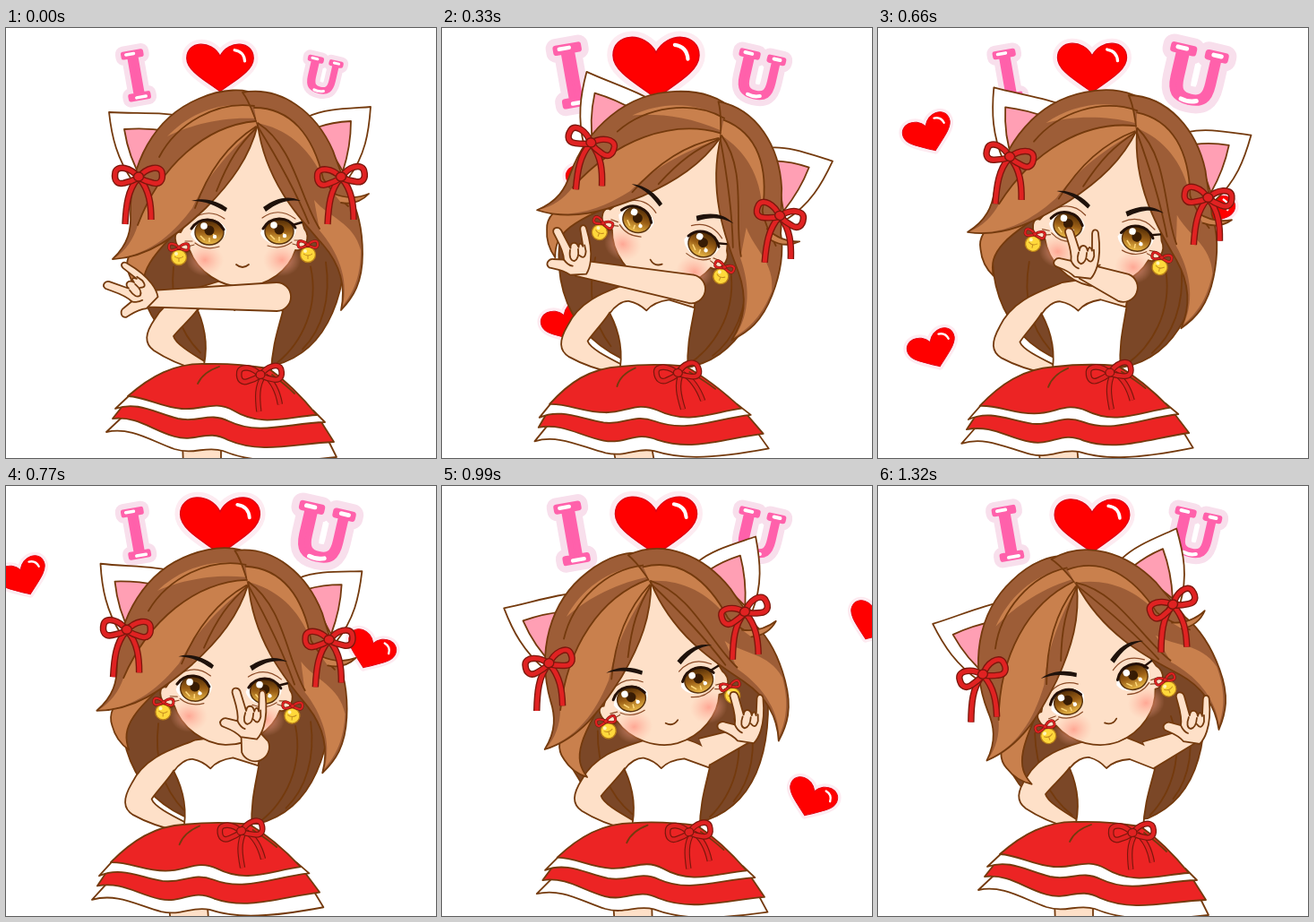
These frames come from a looping animation (480x480 px, 1.98 s). An HTML page:

```html
<!DOCTYPE html>
<html lang="en">
<head>
<meta charset="utf-8">
<title>I love U</title>
<style>
html, body { margin: 0; width: 100%; height: 100%; overflow: hidden; background: #fff; }
svg { display: block; width: 100vw; height: 100vh; }
.ol { stroke: #743a0d; stroke-width: 1.8; stroke-linejoin: round; stroke-linecap: round; }
.no { fill: none; }
.skin { fill: #fee0c8; }
.lt { fill: #c9804d; }
.md { fill: #9d5d37; }
.dk { fill: #7b4727; }
.red { fill: #ec2424; }
.white { fill: #fff; }
.pink { fill: #ff9fb4; }
.edge { fill: none; stroke: #7c170c; stroke-width: 7.5; stroke-linejoin: round; }
.ribbon { fill: none; stroke: #e02222; stroke-width: 4.8; stroke-linejoin: round; }
.shine { fill: none; stroke: #fff; stroke-width: 4; stroke-linecap: round; }
text { font-family: "DejaVu Serif", serif; text-anchor: middle; fill: #ff61ab; stroke: #ff61ab; stroke-width: 6; stroke-linejoin: round; }
.glow { stroke: #f8dfec; stroke-width: 20; fill: #f8dfec; }
</style>
</head>
<body>
<svg viewBox="0 0 480 480">
<defs>
  <radialGradient id="blush"><stop offset="0" stop-color="#ff9483" stop-opacity=".75"/><stop offset="1" stop-color="#ffb39c" stop-opacity="0"/></radialGradient>
  <linearGradient id="iris" x2="0" y2="1"><stop offset="0" stop-color="#4d2905"/><stop offset=".5" stop-color="#9b5f16"/><stop offset="1" stop-color="#eebd4a"/></linearGradient>
  <path id="hs" d="M0 32C-18 18-46 4-46-14C-46-38-12-40 0-17C12-40 46-38 46-14C46 4 18 18 0 32Z"/>
  <g id="heart">
    <use href="#hs" fill="#fdebf1" stroke="#fdebf1" stroke-width="13" stroke-linejoin="round"/>
    <use href="#hs" fill="#f00" stroke="#e00010" stroke-width="1.5"/>
    <path class="shine" d="M20-25Q33-23 34-10"/>
  </g>
  <path id="ls" d="M0 1C-9-11-24-13-26-5C-28 5-23 9-16 7Q-7 5 0 1C9-11 24-13 26-5C28 5 23 9 16 7Q7 5 0 1Z"/>
  <path id="ts" d="M-1 2C-12 15-14 32-15 53M1 2C12 15 14 31 14 48"/>
  <g id="loops"><use href="#ls" class="edge"/><use href="#ls" class="ribbon"/><ellipse rx="5.5" ry="5" fill="#e02222" stroke="#7c170c" stroke-width="1.4"/></g>
  <g id="tails"><use href="#ts" class="edge"/><use href="#ts" class="ribbon"/></g>
  <g id="bell">
    <circle cy="4" r="8.5" fill="#ffd83b" stroke="#b9801a" stroke-width="1.3"/>
    <path d="M-5 3Q0 7 5 3M0 5V9" fill="none" stroke="#c58d20"/>
    <circle cx="-3" r="2" fill="#fff6b8"/>
    <use href="#loops" transform="translate(0 -7) scale(.42)"/>
  </g>
  <g id="eye">
    <path class="white" d="M-20 3C-14-15 12-19 20-2C19 18-13 22-20 3Z"/>
    <ellipse cx="1" cy="1" rx="16" ry="14" fill="url(#iris)" stroke="#5b330c" stroke-width="1.5"/>
    <path d="M-9 5L-4 10M1 12V7M9 7L5 3" stroke="#ffd87a" stroke-width="1.5"/>
    <circle cx="1" cy="-1" r="5.5" fill="#381c04"/>
    <circle cx="-5" cy="-6" r="3.8" fill="#fff"/><circle cx="7" cy="6" r="2.2" fill="#fff"/>
  </g>
  <g id="lids" class="no" stroke="#241006" stroke-linecap="round">
    <path d="M-17-2C-9-16 10-17 19-3" stroke-width="3"/>
    <path d="M-18-14Q0-27 19-13M-12 17Q3 22 15 13M16 15L23 17M18 11L26 11" stroke="#8b4b27" stroke-width="1.2"/>
  </g>
</defs>

<g id="I"><text class="glow" y="29" font-size="80">I</text><text y="29" font-size="80">I</text>
  <path class="shine" d="M-8-28H2M-4 28H8"/></g>
<g id="U"><text class="glow" y="23" font-size="63">U</text><text y="23" font-size="63">U</text>
  <path class="shine" d="M-20-22H-12M13-22H20M-7 23Q0 25 7 22" stroke-width="3"/></g>
<use id="mid" href="#heart"/>
<g id="fly"></g>

<g id="back">
  <path class="ol dk" d="M-112-40C-136 60-104 124-35 148L35 150C95 134 120 70 115-30Z"/>
  <path class="ol no" stroke-width="1" d="M-78 40Q-84 100-48 136M75 40C85 85 65 125 38 147M92 35C98 75 88 110 66 132"/>
</g>

<g id="body">
  <path class="ol skin" d="M240 282C220 289 184 294 166 325C155 341 154 352 165 360C180 370 200 378 217 383L223 373C205 362 189 352 187 344C194 335 207 324 214 314L222 336L303 336L312 302C306 290 290 286 275 280Z"/>
  <path class="ol white" d="M214 315C220 307 229 302 236 303Q247 306 255 315Q264 306 281 305L309 316C304 336 297 355 296 384H219C226 360 223 336 214 315Z"/>
  <g id="skirt">
    <path class="ol skin" d="M197 462L198 490H240V462Z"/>
    <path class="ol white" d="M130 434L112 451C140 445 162 461 188 470C210 477 223 466 242 472C266 482 297 487 369 479L357 455Z"/>
    <path class="ol red" d="M134 417L119 436C147 433 163 449 188 456C213 463 224 447 248 460C285 476 322 464 366 462L347 432Z"/>
    <path class="ol white" d="M140 408L122 425C147 416 167 430 192 436C216 441 226 428 249 439C282 455 316 441 356 440L343 427Z"/>
    <path class="ol red" d="M222 375C188 374 161 389 136 411C157 412 172 423 196 425C220 427 232 415 254 427C285 446 313 434 347 432C329 410 313 394 293 380Q257 374 222 375Z"/>
    <path class="ol no" d="M238 378Q220 384 214 397M297 387Q313 399 322 408"/>
    <g transform="translate(284 387) rotate(-4)"><use href="#tails" transform="translate(4) rotate(-6) scale(.85 .75)"/><use href="#loops" transform="scale(.9)"/></g>
  </g>
</g>

<g id="head">
  <path class="ol white" d="M205 98C178 91 146 94 115 92C118 120 124 144 142 170Z"/>
  <path class="ol pink" d="M180 113Q157 109 132 111Q137 143 152 167Z"/>
  <path class="ol white" d="M337 97C356 88 380 88 407 86C405 115 401 140 382 166Z"/>
  <path class="ol pink" d="M347 109Q364 103 385 102Q385 130 376 158Z"/>
  <path class="ol skin" d="M195 226C186 224 187 240 197 247Q200 250 205 246C214 271 241 287 264 287C293 286 316 268 323 246C333 248 341 232 333 222L315 160L281 105L238 150Z"/>
  <ellipse cx="222" cy="257" rx="21" ry="18" fill="url(#blush)"/>
  <ellipse cx="308" cy="257" rx="21" ry="18" fill="url(#blush)"/>
  <use href="#eye" x="226" y="225"/><use href="#eye" x="304" y="224"/>
  <use href="#lids" transform="translate(226 225) scale(-1 1)"/><use href="#lids" x="304" y="224"/>
  <path class="no" d="M320 218L330 215" stroke="#241006" stroke-width="2.4" stroke-linecap="round"/>
  <path class="ol no" d="M257 262Q264 268 271 262"/>
  <path class="ol lt" d="M225 185C160 220 126 247 137 272C141 285 149 293 157 298C147 274 155 255 222 196Z"/>
  <path class="ol md" d="M281 106C272 142 252 170 223 199C190 230 160 254 119 256C137 239 140 222 139 205C138 150 165 98 215 77C242 65 268 65 280 73Q286 92 281 106Z"/>
  <path class="lt" d="M277 85C238 79 204 94 180 119C202 108 237 97 278 99Z"/>
  <path class="lt" d="M279 102C222 107 172 152 147 218Q140 242 121 255C163 252 190 223 208 199C222 169 245 138 280 109Z"/>
  <path class="ol md" d="M281 106C275 92 272 80 264 70C307 62 346 92 365 135C371 153 379 170 382 182C394 202 398 225 398 250C398 282 388 298 374 313C380 285 373 262 354 240C334 217 290 174 281 106Z"/>
  <path class="lt" d="M277 87C318 87 343 118 354 166C338 130 312 110 280 104Z"/>
  <path class="lt" d="M344 190C361 210 388 215 396 246C396 275 388 293 376 308C383 277 370 247 350 224Z"/>
  <g class="ol no" stroke-width="1.2">
    <path d="M279 108C249 127 226 157 211 199M280 109C260 128 248 147 235 180M279 102C222 107 172 152 147 218M277 85C236 79 191 104 171 142M281 108C299 137 320 172 338 216M281 104C322 130 328 188 350 222M277 87C318 87 343 118 354 166C361 178 372 188 382 197"/>
    <path d="M366 183Q386 191 405 183Q393 196 374 193" class="lt"/>
  </g>
  <path d="M245 203C233 196 224 191 207 191C222 186 238 192 247 199ZM287 198C301 188 315 184 329 191C315 189 304 192 290 203Z" fill="#1f120b"/>
  <use href="#bell" x="193" y="250"/><use href="#bell" x="337" y="247"/>
  <g transform="translate(148 164)"><use class="hang" href="#tails"/><use href="#loops"/></g>
  <g transform="translate(374 164)"><use class="hang" href="#tails"/><use href="#loops" transform="rotate(-5)"/></g>
</g>

<path id="arm" class="ol skin"/>
<g id="hand" class="ol skin">
  <path d="M-9 17C-17 8-25 7-30 4C-34-1-28-6-23-4L-12-1C-10-12-15-24-17-33C-17-39-10-39-8-34L-2-12C-1-19 6-19 7-11C9-17 11-15 12-11L13-30C14-36 20-35 20-29C21-17 20-3 17 6Q14 15 9 20Z"/>
  <path class="no" d="M-3-10Q-7 1-1 3Q5 2 6-9M6-2Q11 5 14-5V-12M-12-1Q-9 6-4 8"/>
</g>
</svg>
<script>
const STEP = 110, LOOP = 1980, LAST = 12, SETTLE = 10;
const { sin, cos, exp, min, max, PI, hypot } = Math;
const $ = id => document.getElementById(id);
const set = (el, v) => el.setAttribute('transform', v);
const smooth = t => t <= 0 ? 0 : t * t * (3 - 2 * t);
const pulse = (s, mean, size, period) => mean - size * cos(2 * PI * s / period);
const hanging = document.querySelectorAll('.hang');

// An upper and a lower heart fly out to each side.
const hearts = [-1, 1].flatMap(side => [true, false].map(upper => {
  const el = document.createElementNS('http://www.w3.org/2000/svg', 'use');
  el.setAttribute('href', '#heart');
  $('fly').append(el);
  return { el, side, upper, start: side < 0 ? 3 : upper ? 5 : 7 };
}));

function drawHeart({ el, side, upper, start }, step) {
  const n = step - start;
  const out = upper ? 82 + 37 * n : 110 + 26 * n;
  const y = upper ? 192 + 25 * side - 16 * n : 330 + 10 * n;
  const seen = n >= (side > 0 ? 1 : 0) && n <= (upper ? 4 : 3);
  el.style.display = seen ? '' : 'none';
  set(el, `translate(${250 + side * out} ${y}) rotate(${22 * side}) scale(.6)`);
}

function armPath(sx, sy, wx, wy) {
  const len = hypot(wx - sx, wy - sy), nx = (sy - wy) / len, ny = (wx - sx) / len;
  const at = (x, y, r) => `${x + nx * r} ${y + ny * r}`;
  const cap = wx < sx ? `A16 16 0 0 0 ${at(sx, sy, 16)}` : '';
  return `M${at(sx, sy, 16)}L${at(wx, wy, 9)}L${at(wx, wy, -9)}L${at(sx, sy, -16)}${cap}`;
}

function draw(step) {
  const s = min(step, SETTLE);
  const tilt = 22 * sin(PI * s / 7.3);
  const sway = -27 * sin(PI * s / SETTLE);
  const headX = 247 + 18 * exp(-s / 3);
  set($('head'), `translate(${headX} 226.5) rotate(${tilt}) translate(-265 -224.5)`);
  hanging.forEach(t => set(t, `rotate(${-.9 * tilt})`));
  set($('back'), `translate(${headX} 226.5) rotate(${.35 * tilt})`);
  set($('body'), `translate(${sway}) rotate(${.2 * sway} 258 380)`);
  set($('skirt'), `translate(0 380) skewX(${max(0, 6 * sin(PI * s / 6))}) translate(0 -380)`);

  const sweep = smooth((s - 3) / 7);
  const x = 148 + 202 * sweep, y = 255 + 41 * exp(-s) + 13 * sweep;
  const turn = -55 * exp(-s / 2), rad = turn * PI / 180;
  set($('hand'), `translate(${x} ${y}) rotate(${turn})`);
  $('arm').setAttribute('d', armPath(302 + 1.1 * sway, 300 + .4 * sway, x - 11 * sin(rad), y + 11 * cos(rad)));

  set($('I'), `translate(145 53) rotate(-10) scale(${pulse(step, 1, .12, 6.6)})`);
  set($('mid'), `translate(239 45) scale(${pulse(step, .93, .12, 5.4)})`);
  set($('U'), `translate(353 53) rotate(13) scale(${pulse(min(step, 9), 1, .24, 12)})`);
  hearts.forEach(h => drawHeart(h, step));
}

let shown = -1;
function tick() {
  const step = min(LAST, Math.floor(performance.now() % LOOP / STEP));
  if (step !== shown) draw(shown = step);
  requestAnimationFrame(tick);
}
tick();
</script>
</body>
</html>
```
